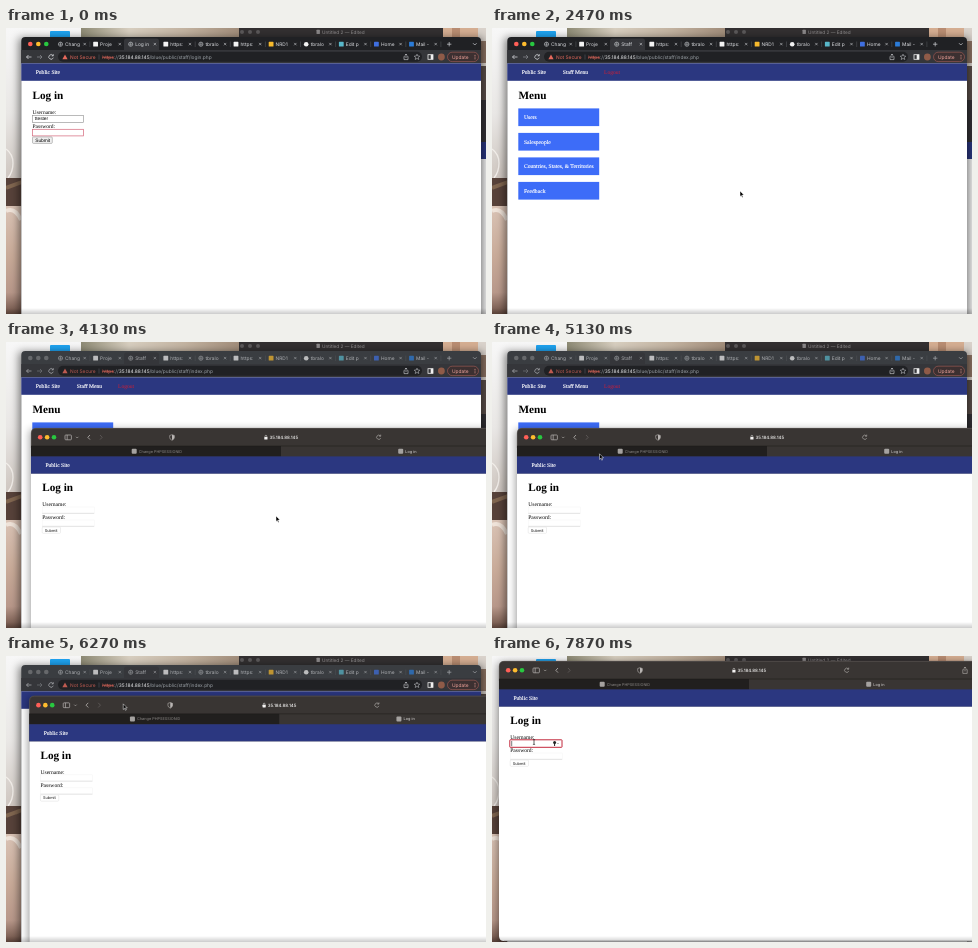
An HTML page for the animation above (8000 ms loop, 480 px wide and 286 px high).

```html
<!DOCTYPE html>
<html lang="en">
<head>
<meta charset="utf-8">
<title>Log in</title>
<style>
  html, body { margin: 0; width: 100%; height: 100%; overflow: hidden; background: #f1f0ef; }
  svg { display: block; width: 480px; height: 286px; }
  text { white-space: pre; text-rendering: geometricPrecision; }
  .ui { font-family: Inter, sans-serif; }
  .page { font-family: "Liberation Serif", serif; }
  .form { font-family: "Liberation Sans", sans-serif; }
  .nav { stroke: #fff; stroke-width: .15px; }
</style>
</head>
<body>
<svg id="stage" viewBox="0 0 480 286" xmlns="http://www.w3.org/2000/svg">
  <defs>
    <linearGradient id="wall" x1="0" y1="0" x2="0" y2="1">
      <stop offset="0" stop-color="#f7f7f7"/>
      <stop offset=".3" stop-color="#e9e7e5"/>
      <stop offset=".52" stop-color="#cfc7c1"/>
    </linearGradient>
    <linearGradient id="couch" x1="0" y1="0" x2="0" y2="1">
      <stop offset="0" stop-color="#d9c3b5"/>
      <stop offset=".45" stop-color="#c9ab99"/>
      <stop offset=".8" stop-color="#b8988a"/>
      <stop offset="1" stop-color="#6d5146"/>
    </linearGradient>
    <linearGradient id="shelf" x1="0" y1="0" x2="1" y2="0">
      <stop offset="0" stop-color="#8d8a74"/>
      <stop offset=".3" stop-color="#d8cfc0"/>
      <stop offset=".65" stop-color="#c3b3a1"/>
      <stop offset="1" stop-color="#a08c79"/>
    </linearGradient>
    <linearGradient id="edge" x1="0" y1="0" x2="0" y2="1">
      <stop offset="0" stop-color="#000" stop-opacity="0"/>
      <stop offset="1" stop-color="#000" stop-opacity=".2"/>
    </linearGradient>
    <filter id="soft" x="-10%" y="-10%" width="120%" height="120%">
      <feGaussianBlur stdDeviation="4"/>
    </filter>
  </defs>
</svg>
<script>
const LOOP = 8000;
const HOST = "35.184.88.145";
const BLUE = "#2b3780", RED = "#c3283c";
const LIGHTS = ["#ff5f57", "#febc2e", "#28c840"];
const stage = document.getElementById("stage");

function el(tag, attrs, parent) {
  const node = document.createElementNS(stage.namespaceURI, tag);
  for (const k in attrs) node.setAttribute(k, attrs[k]);
  parent.appendChild(node);
  return node;
}
const group = (p, attrs = {}) => el("g", attrs, p);
const rect = (p, x, y, width, height, fill, more = {}) =>
  el("rect", { x, y, width, height, fill, ...more }, p);
const dot = (p, cx, cy, r, fill, more = {}) => el("circle", { cx, cy, r, fill, ...more }, p);
const line = (p, d, stroke, width = 0.7, more = {}) =>
  el("path", { d, stroke, "stroke-width": width, fill: "none", ...more }, p);
function label(p, x, y, str, size, fill, cls = "ui", more = {}) {
  const t = el("text", { x, y, "font-size": size, fill, class: cls, ...more }, p);
  t.textContent = str;
  return t;
}
const heading = (p, x, y, str) =>
  label(p, x, y, str, 11.2, "#000", "page", { "font-weight": "bold" });
const navText = (p, x, y, str) => label(p, x, y, str, 5.6, "#fff", "page nav");
const show = (node, on) => node.setAttribute("visibility", on ? "inherit" : "hidden");
const move = (node, [x, y]) => node.setAttribute("transform", `translate(${x} ${y})`);

function drawDesk(p) {
  rect(p, 0, 0, 480, 286, "url(#wall)");
  line(p, "M0 121 Q7 126 7 135 T2 150", "#f2eeea", 1.4);
  rect(p, 0, 150, 16, 29, "#57423a");
  line(p, "M0 160 L16 154", "#806650", 4);
  rect(p, 0, 178, 16, 108, "url(#couch)");
  line(p, "M0 183 Q9 179 15 192", "#efe3d9", 4);
  rect(p, 44, 3, 20, 8, "#1fa4f2", { rx: 1 });
  rect(p, 75, 0, 160, 11, "url(#shelf)");
  rect(p, 437, 0, 36, 11, "#d5ae92");
  rect(p, 446, 0, 8, 11, "#b98d72");
  rect(p, 472, 0, 8, 40, "#d9d2cb");
  rect(p, 474, 13, 6, 22, "#8d7464");
  rect(p, 474, 38, 6, 34, "#5b4f4a");
  rect(p, 474, 72, 6, 42, "#343236");
  rect(p, 474, 114, 6, 17, BLUE);
  rect(p, 474, 131, 6, 155, "#f4f4f4");
  rect(p, 233, -6, 204, 22, "#333031", { rx: 4 });
  [236, 244, 252].forEach(x => dot(p, x, 4, 2, "#5c595a"));
  rect(p, 310.5, 1.7, 3.4, 4.4, "#8b8889", { rx: 0.5 });
  label(p, 316, 6, "Untitled 2 — Edited", 4.7, "#969394");
}

function drawGlobe(p, x, y) {
  dot(p, x, y, 2.1, "none", { stroke: "#c6c9cd", "stroke-width": 0.6 });
  line(p, `M${x - 2} ${y}h4M${x} ${y - 2}v4`, "#c6c9cd", 0.5);
}

function drawLights(p, x, y, gap, fills) {
  return fills.map((f, i) => dot(p, x + i * gap, y, 2.3, f));
}

function drawChrome(p) {
  const chrome = {}, left = 15.3, wide = 459.7;
  rect(p, 13, 10, 464, 290, "#000", { opacity: 0.5, filter: "url(#soft)" });
  chrome.strip = rect(p, left, 9, wide, 290, "#202124", { rx: 4 });
  chrome.lights = drawLights(p, 24.3, 16, 8, LIGHTS);
  rect(p, 118, 10.5, 35, 14, "#35363a", { rx: 2.5 });
  rect(p, left, 22, wide, 14, "#35363a");
  chrome.tools = group(p);
  const g = chrome.tools;

  const tabs = [
    ["Chang", "globe"], ["Proje", "#f3f3f3"], ["Log in", "globe"], ["https:", "#f3f3f3"],
    ["tbralo", "globe"], ["https:", "#f3f3f3"], ["NRD1", "#f6b92c"], ["tbralo", "round"],
    ["Edit p", "#58b7c9"], ["Home", "#3f6fe0"], ["Mail -", "#2b7cd8"]
  ];
  tabs.forEach(([name, icon], i) => {
    const x = 54.5 + 35.1 * i;
    if (icon === "globe") drawGlobe(g, x, 16.2);
    else if (icon === "round") dot(g, x, 16.2, 2.3, "#f2f2f2");
    else rect(g, x - 2.4, 13.8, 4.8, 4.8, icon, { rx: 0.6 });
    const t = label(g, x + 4.5, 18, name, 4.85, "#dfe1e5");
    if (i === 2) chrome.tab = t;
    line(g, `M${x + 23} 14.9l2.4 2.4m0 -2.4l-2.4 2.4`, "#d3d5d9", 0.55);
    if (i !== 1 && i !== 2) line(g, `M${x + 29.4} 13.5v5.5`, "#5b5e63", 0.5);
  });
  line(g, "M441 16.2h4.4M443.2 14v4.4", "#d3d5d9");
  line(g, "M467 15.2l1.8 1.8l1.8 -1.8", "#d3d5d9");

  line(g, "M25.5 29h-5m2 -2l-2 2l2 2", "#e2e4e8");
  line(g, "M31 29h5m-2 -2l2 2l-2 2", "#8b8e93");
  line(g, "M47 27.6a2.3 2.3 0 1 0 .3 2.1M47.3 26.2v1.7h-1.7", "#e2e4e8");
  rect(p, 52, 23.8, 364, 10, "#202124", { rx: 5 });
  chrome.warn = group(p);
  el("path", { d: "M59 26.4l2.6 4.8h-5.2z", fill: "#e5695c" }, chrome.warn);
  label(chrome.warn, 64, 30.9, "Not Secure", 4.85, "#e5695c");
  line(p, "M93 26.5v5", "#5f6368", 0.5);
  const url = label(p, 96.3, 30.9, "", 4.85, "#9aa0a6");
  const span = (str, fill) => {
    const s = el("tspan", { fill }, url);
    s.textContent = str;
    return s;
  };
  span("https", "#e5695c").setAttribute("style", "text-decoration: line-through .3px");
  span("://", "#9aa0a6");
  span(HOST, "#f0f1f3");
  chrome.path = span("", "#9aa0a6");
  line(p, "M398.6 28.4h-.6v3.2h4v-3.2h-.6M400 30v-4m-1.2 1.2l1.2 -1.2l1.2 1.2", "#d3d5d9", 0.6);
  line(p, "M411 26.2l.8 1.8l2 .2l-1.5 1.3l.5 2l-1.8 -1.1l-1.8 1.1l.5 -2l-1.5 -1.3l2 -.2z", "#d3d5d9", 0.5);
  rect(p, 422, 26.7, 5, 4.6, "none", { stroke: "#f0f0f0", "stroke-width": 0.8 });
  rect(p, 424.7, 26.7, 2.3, 4.6, "#f0f0f0");
  dot(p, 435.4, 29, 3.4, "#8f5b48");
  rect(p, 441.5, 24.2, 31, 9.4, "#3c3031", { rx: 4.7, stroke: "#a95f58", "stroke-width": 0.6 });
  label(p, 446, 30.7, "Update", 4.85, "#f0a39b");
  [27.2, 29, 30.8].forEach(y => dot(p, 469, y, 0.5, "#f0a39b"));

  rect(p, left, 35.3, wide, 255, "#fff");
  rect(p, left, 35.3, wide, 17.5, BLUE);
  navText(p, 29.7, 46.3, "Public Site");

  chrome.login = group(p);
  drawForm(chrome.login);
  chrome.menu = group(p);
  navText(chrome.menu, 70.8, 46.3, "Staff Menu");
  label(chrome.menu, 112, 46.3, "Logout", 5.6, "#d01f33", "page");
  heading(chrome.menu, 26.5, 70.5, "Menu");
  ["Users", "Salespeople", "Countries, States, & Territories", "Feedback"].forEach((s, i) => {
    const y = 80.4 + 24.5 * i;
    rect(chrome.menu, 26.3, y, 80.9, 17.7, "#3d6cf8");
    navText(chrome.menu, 32, y + 10.8, s);
  });

  function drawForm(g) {
    heading(g, 26.5, 70.5, "Log in");
    label(g, 26.5, 85.7, "Username:", 5.5, "#000", "page");
    rect(g, 26.5, 87.3, 51, 7, "#fff", { stroke: "#8d8d8d", "stroke-width": 0.6 });
    label(g, 28.8, 92.4, "ttester", 4.8, "#000", "form");
    label(g, 26.5, 99.5, "Password:", 5.5, "#000", "page");
    rect(g, 26.5, 101.3, 51, 6.6, "#fff", { stroke: "#d4667a", "stroke-width": 0.7 });
    chrome.dots = group(g);
    for (let i = 0; i < 8; i++) dot(chrome.dots, 29.6 + i * 2.5, 104.7, 0.85, "#111");
    rect(g, 26.5, 108.9, 19.8, 6.5, "#efefef", { rx: 1, stroke: "#858585", "stroke-width": 0.5 });
    label(g, 29.2, 113.8, "Submit", 4.8, "#000", "form");
  }
  return chrome;
}

// Drawn with its top left corner at 0,0 and moved as one group.
function drawSafari(p) {
  const safari = {};
  rect(p, -1, 2, 520, 282, "#000", { opacity: 0.4, filter: "url(#soft)" });
  rect(p, 0, 0, 520, 280, "#393533", { rx: 5 });
  line(p, "M0.3 20V5Q.3 .3 5 .3H500", "#65605e", 0.5);
  safari.lights = drawLights(p, 9.2, 9.3, 6.9, LIGHTS);
  safari.icons = group(p);
  const ink = "#b9b5b3";
  rect(safari.icons, 34, 7, 6.4, 4.8, "none", { rx: 0.8, stroke: ink, "stroke-width": 0.7 });
  line(safari.icons, "M36.2 7v4.8", ink);
  line(safari.icons, "M45 8.8l1.2 1.2l1.2 -1.2", ink, 0.6);
  line(safari.icons, "M59 7l-2.2 2.3l2.2 2.3", ink, 0.8);
  line(safari.icons, "M69 7l2.2 2.3l-2.2 2.3", "#625e5c", 0.8);
  line(safari.icons, "M141 6.7l2.3 .8v2q0 1.8 -2.3 2.8q-2.3 -1 -2.3 -2.8v-2z", ink, 0.6);
  el("path", { d: "M141 6.7l2.3 .8v2q0 1.8 -2.3 2.8z", fill: ink }, safari.icons);
  line(safari.icons, "M349.4 8a2.1 2.1 0 1 0 .3 2M349.7 6.6v1.6h-1.6", ink, 0.6);
  line(safari.icons, "M464.8 8.6h-1v3.8h4.4v-3.8h-1M466 10.4v-4.4m-1.3 1.3l1.3 -1.3l1.3 1.3", ink, 0.6);
  rect(p, 233.3, 9, 3.2, 2.6, "#f3f2f1", { rx: 0.4 });
  line(p, "M234 9v-.8a.9 .9 0 0 1 1.8 0v.8", "#f3f2f1", 0.5);
  label(p, 238.4, 11, HOST, 4.45, "#f5f4f3", "ui", { "font-weight": 500 });

  rect(p, 0, 18, 250, 10.6, "#211f1e");
  line(p, "M0 18h520", "#1a1817", 0.5);
  safari.tabs = group(p);
  [[100.7, "#8d8a88", "Change PHPSESSIONID"], [367.2, "#e4e2e1", "Log in"]].forEach(([x, fill, s]) => {
    rect(safari.tabs, x, 20.7, 5, 5, "#a5a2a0", { rx: 1 });
    label(safari.tabs, x + 7.1, 24.6, s, 3.85, fill);
  });

  rect(p, 0, 28.4, 520, 17.4, BLUE);
  el("path", { d: "M0 45.7H520V280H5Q0 280 0 275z", fill: "#fff" }, p);
  line(p, "M5 279.7H520", "#bdbdbd", 0.7);
  navText(p, 14.4, 39.3, "Public Site");
  heading(p, 11.2, 63, "Log in");
  label(p, 11.2, 77.8, "Username:", 5.6, "#000", "page");
  label(p, 11.2, 90.8, "Password:", 5.6, "#000", "page");
  [79, 92].forEach(y => {
    rect(p, 11.2, y, 52, 6.3, "none", { stroke: "#f3f3f3", "stroke-width": 0.5 });
    line(p, `M11.2 ${y + 6.3}h52`, "#d4d4d4", 0.6);
  });
  rect(p, 11.2, 99, 18.3, 6.3, "#fff", { rx: 1, stroke: "#dcdcdc", "stroke-width": 0.5 });
  label(p, 13.8, 103.5, "Submit", 3.9, "#111");

  safari.focus = group(p);
  rect(safari.focus, 10.8, 78.8, 52.2, 7.5, "#fff", { rx: 0.5, stroke: RED, "stroke-width": 1 });
  dot(safari.focus, 55.6, 81.5, 1.5, "#222");
  line(safari.focus, "M55.6 82v3", "#222", 1);
  line(safari.focus, "M57.9 82l1 1l1 -1", "#888", 0.6);
  safari.caret = line(safari.focus, "M12.7 80v5.2", "#222", 0.6);
  return safari;
}

const ease = u => u * u * (3 - 2 * u);
// Keys are [time, x, y]; each leg is eased unless another curve is given.
function along(keys, t, curve = ease) {
  if (t <= keys[0][0]) return keys[0].slice(1);
  for (let i = 1; i < keys.length; i++) {
    const [t1, x1, y1] = keys[i], [t0, x0, y0] = keys[i - 1];
    if (t < t1) {
      const u = curve((t - t0) / (t1 - t0));
      return [x0 + (x1 - x0) * u, y0 + (y1 - y0) * u];
    }
  }
  return keys[keys.length - 1].slice(1);
}

const dragKeys = [[5730, 25, 86], [6000, 25, 69], [6270, 23.3, 40], [6400, 15, 21], [6530, 8, 5], [6600, 7, 5]];
const pointerKeys = [
  [1930, 40, 68], [2470, 248, 163], [2670, 248, 163], [2930, 340, 288], [3700, 340, 288],
  [4130, 270, 174], [4400, 270, 174], [5130, 107.5, 111.8], [5270, 107.5, 111.8], [5530, 119, 94]
];
const reachKeys = [[6600, 101, 13], [7400, 42, 86]];

drawDesk(group(stage));
const chrome = drawChrome(group(stage));
const safariBox = group(stage);
const safari = drawSafari(safariBox);
rect(stage, 0, 280, 480, 6, "url(#edge)");
const arrow = el("path", {
  d: "M0 0V5.6L1.3 4.4L2.2 6.4L3.1 6L2.2 4H4z",
  fill: "#000", stroke: "#fff", "stroke-width": 0.5
}, stage);
const beam = line(stage, "M-1.1 -2.6Q0 -2.6 0 -1.8V1.8Q0 2.6 -1.1 2.6M1.1 -2.6Q0 -2.6 0 -1.8M0 1.8Q0 2.6 1.1 2.6", "#222", 0.7);

function draw(t) {
  const signedIn = t >= 930, opened = t >= 3330, active = t >= 3400;
  chrome.tab.textContent = signedIn ? "Staff" : "Log in";
  chrome.path.textContent = "/blue/public/staff/" + (signedIn ? "index" : "login") + ".php";
  show(chrome.login, !signedIn);
  show(chrome.menu, signedIn);
  show(chrome.dots, t >= 470);
  chrome.strip.setAttribute("fill", active ? "#3a3d41" : "#202124");
  chrome.warn.setAttribute("opacity", active ? 0.8 : 1);
  chrome.tools.setAttribute("opacity", active ? 0.7 : 1);
  LIGHTS.forEach((c, i) => {
    chrome.lights[i].setAttribute("fill", active ? "#66686b" : c);
    safari.lights[i].setAttribute("fill", active ? c : "#63605e");
  });
  safari.icons.setAttribute("opacity", active ? 1 : 0.6);
  safari.tabs.setAttribute("opacity", active ? 1 : 0.5);

  show(safariBox, opened);
  const win = along(dragKeys, t, u => u);
  move(safariBox, win);
  show(safari.focus, t >= 7470);
  show(safari.caret, t >= 7530);

  let tip = along(pointerKeys, t);
  if (t >= 6600) tip = along(reachKeys, t);
  else if (t >= 5730) tip = [win[0] + 94, win[1] + 8];
  const typing = t >= 6600 && tip[1] > 82;
  move(arrow, tip);
  move(beam, tip);
  show(arrow, t >= 1930 && !typing);
  show(beam, typing);
}

const start = performance.now();
function tick() {
  draw((performance.now() - start) % LOOP);
  requestAnimationFrame(tick);
}
tick();
</script>
</body>
</html>
```
